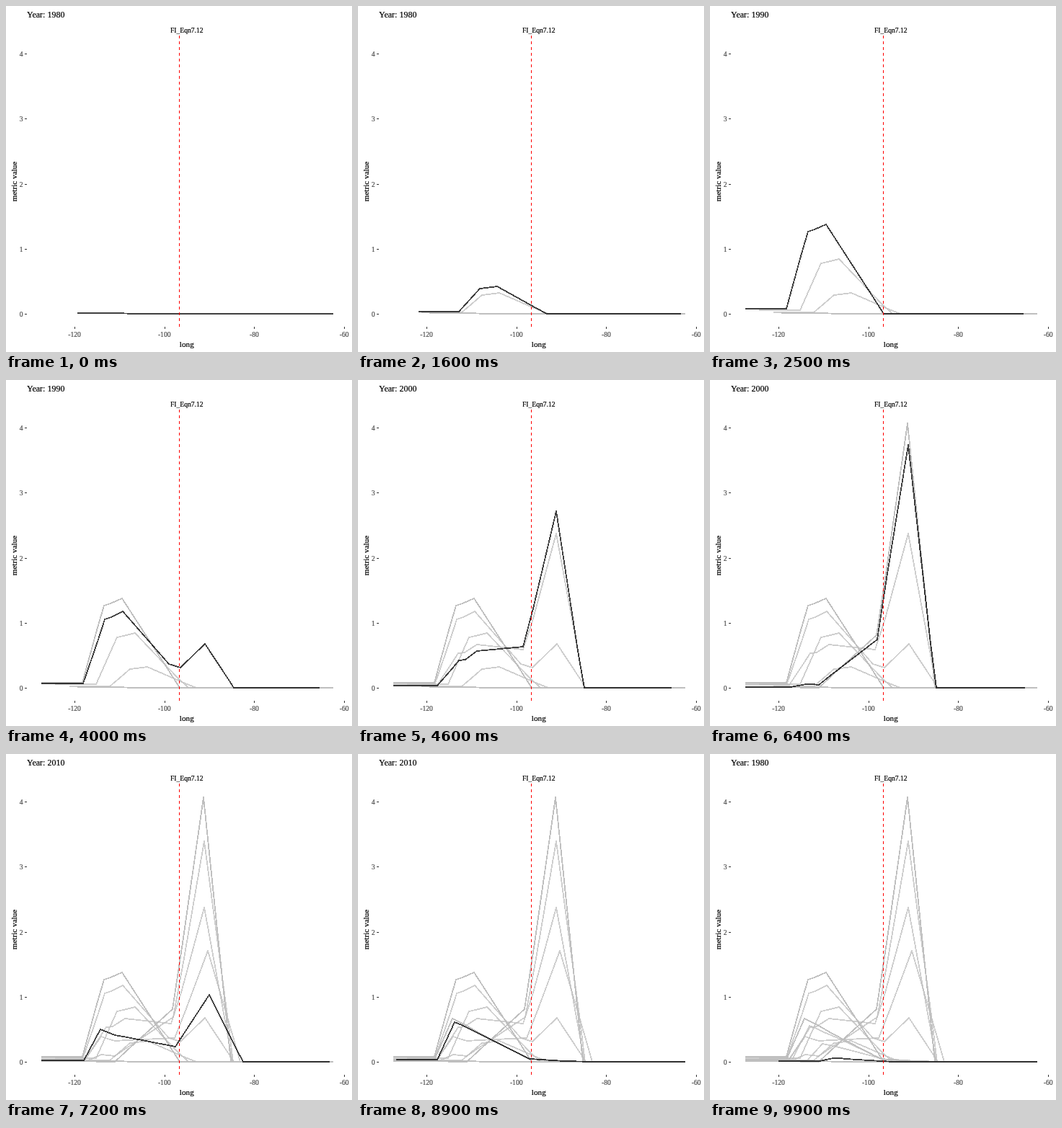
Recreate the animation shown at these times as an HTML page. Size 480 by 480 pixels, loop 10 s.

```html
<!DOCTYPE html>
<html lang="en">
<head>
<meta charset="utf-8">
<title>Metric value by longitude</title>
<style>
  html, body { margin: 0; width: 100%; height: 100%; overflow: hidden; background: #fff; }
  svg { display: block; width: 480px; height: 480px; font-family: "Liberation Serif", "Times New Roman", serif; }
  text { stroke: currentColor; stroke-width: .2; }
  line, polyline { fill: none; shape-rendering: crispEdges; }
  polyline { stroke-width: 1.8; stroke-linejoin: round; stroke-opacity: .75; }
  .trail { stroke: #bebebe; }
  .now { stroke: #000; }
  .ref { stroke: #f00; stroke-dasharray: 4 4; }
  .tick { stroke: #333; }
  .num { font-size: 9.6px; fill: #4d4d4d; color: #4d4d4d; }
  .axis { font-size: 11.2px; }
  .mid { text-anchor: middle; }
  .end { text-anchor: end; }
</style>
</head>
<body>
<svg viewBox="0 0 480 480">
  <text id="year" x="29" y="16" font-size="12">Year: 1980</text>
  <text class="mid" x="250.8" y="37" font-size="9.6">FI_Eqn7.12</text>
  <text class="axis mid" x="250.8" y="473">long</text>
  <text class="axis mid" transform="translate(15 243.5) rotate(-90)">metric value</text>
  <g id="ticks"></g>
  <g id="trails"></g>
  <polyline id="now" class="now"/>
  <line class="ref" x1="240.5" y1="41" x2="240.5" y2="445"/>
</svg>
<script>
const NS = 'http://www.w3.org/2000/svg';
const $ = id => document.getElementById(id);
const lerp = (a, b, k) => a + (b - a) * k;
const toX = long => 95.3 + (long + 120) * 6.235;
const toY = value => 427 - value * 90.25;

function add(parent, tag, attrs, text) {
  const el = document.createElementNS(NS, tag);
  for (const k in attrs) el.setAttribute(k, attrs[k]);
  if (text !== undefined) el.textContent = text;
  parent.appendChild(el);
  return el;
}

// Longitudes of the shared vertices; each decade moves only its corners
const grid = [-127.4, -118.3, -115, -113.5, -112, -109.4, -99.2, -96.6, -90.9, -85.6, -84.4, -65.5];

// Corners per decade, vertex: [long, value]
const decades = [
  { 0: [-119.4, .011], 1: [-110.3, .006], 5: [-102.1, 0], 6: [-94.2, 0], 11: [-62.5, 0] },
  { 0: [-127.4, .08], 1: [-118.3, .08], 3: [-113.5, 1.26], 5: [-109.4, 1.37], 7: [-96.6, 0], 11: [-65.5, 0] },
  { 0: [-127.4, .011], 1: [-117.2, .011], 4: [-111.1, 0], 6: [-98.2, .81], 8: [-91.4, 4.07], 10: [-85.3, 0], 11: [-65.5, 0] },
  { 0: [-127.4, .033], 1: [-118.3, .033], 2: [-114.3, .67], 6: [-97.3, .044], 8: [-89.6, .011], 10: [-81.6, 0], 11: [-62.5, 0] }
];

// Vertices between two corners keep their grid spacing along a straight line
function fill(corners) {
  const keys = Object.keys(corners).map(Number);
  return grid.map((g, i) => {
    const b = keys.find(k => k >= i);
    if (b === i) return corners[i];
    const a = keys[keys.indexOf(b) - 1];
    const k = (g - grid[a]) / (grid[b] - grid[a]);
    return corners[a].map((v, j) => lerp(v, corners[b][j], k));
  });
}
const curves = decades.map(fill);

const STEP = 100, STEPS = 100, SPAN = 25, GAP = 5;

// Each decade rests, then moves linearly to the next one
function pose(step) {
  const state = Math.floor(step / SPAN);
  const rest = state ? 13 : 12;
  const k = Math.max(0, (step % SPAN - rest) / (SPAN - rest));
  return { state, k, next: (state + 1) % curves.length };
}

function points({ state, k, next }) {
  return curves[state].map(([long, value], i) => {
    const [long2, value2] = curves[next][i];
    return Math.round(toX(lerp(long, long2, k))) + ',' + Math.round(toY(lerp(value, value2, k)));
  }).join(' ');
}

for (let v = 0; v <= 4; v++) {
  const y = Math.floor(toY(v) + .5) + .5;
  add($('ticks'), 'line', { class: 'tick', x1: 26, x2: 29, y1: y, y2: y });
  add($('ticks'), 'text', { class: 'num end', x: 23.5, y: Math.round(y + 3.3) }, v);
}
for (let v = -120; v <= -60; v += 20) {
  const x = Math.floor(toX(v)) + .5;
  add($('ticks'), 'line', { class: 'tick', x1: x, x2: x, y1: 445, y2: 448 });
  add($('ticks'), 'text', { class: 'num mid', x: toX(v) - .3, y: 459 }, v);
}

const trails = [];
for (let s = 0; s < STEPS; s += GAP) {
  trails.push(add($('trails'), 'polyline', { class: 'trail', points: points(pose(s)) }));
}

let last = -1;
function draw(time) {
  const step = Math.floor(time / STEP) % STEPS;
  if (step === last) return;
  last = step;
  const p = pose(step);
  $('now').setAttribute('points', points(p));
  $('year').textContent = 'Year: ' + (1980 + 10 * (p.k >= .5 ? p.next : p.state));
  trails.forEach((el, i) => el.setAttribute('visibility', i * GAP < step ? 'visible' : 'hidden'));
}

const start = performance.now();
function tick() {
  draw(performance.now() - start);
  requestAnimationFrame(tick);
}
tick();
</script>
</body>
</html>
```
